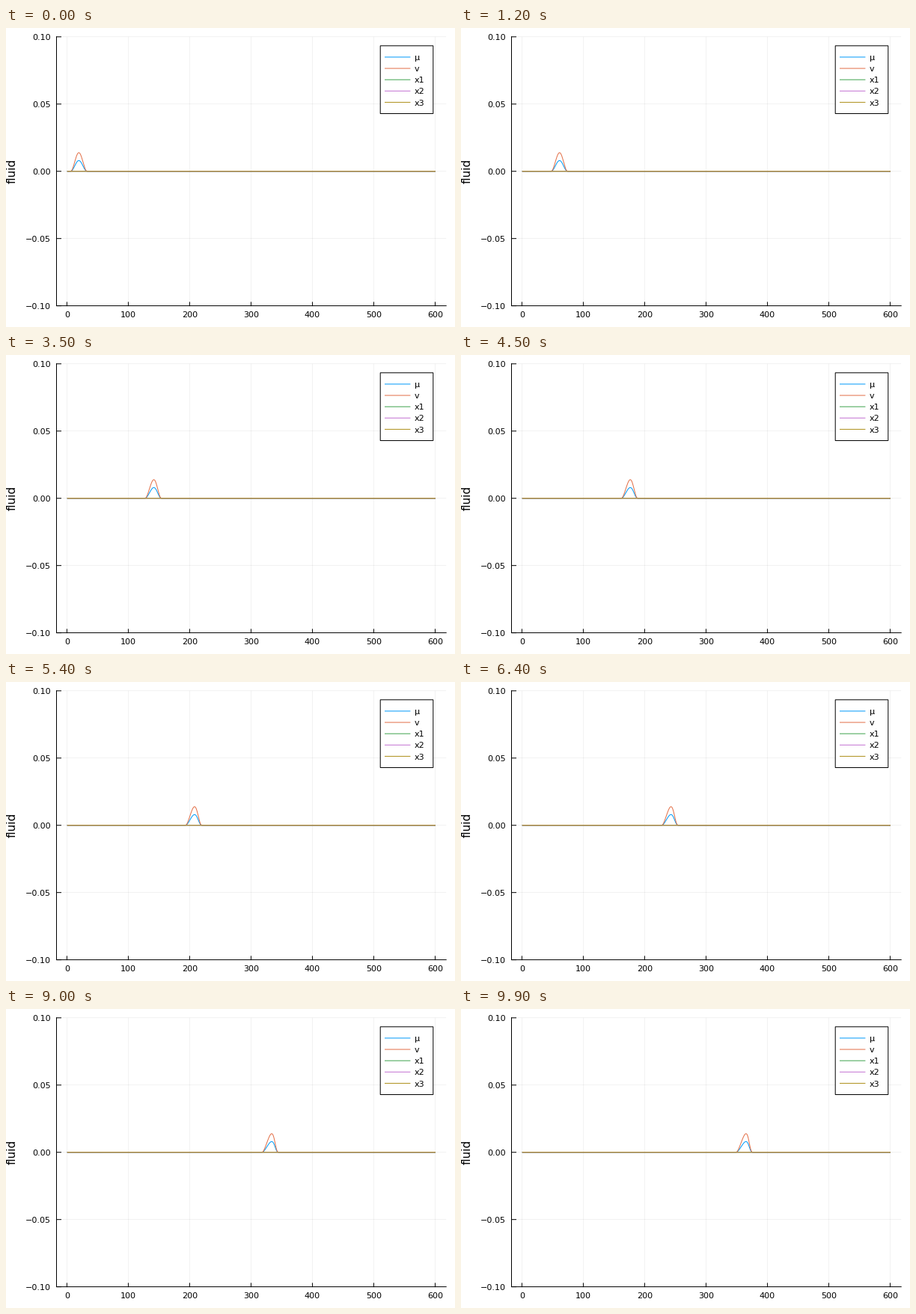
A matplotlib script that plays this animation: 600 by 400 pixels, repeating every 10 s.

```python
import numpy as np
import matplotlib.pyplot as plt
from matplotlib.animation import FuncAnimation
from matplotlib.patches import Rectangle

W, H, DPI = 600, 400, 100
PX = 72 / DPI
LEFT, RIGHT, TOP, BOTTOM = 67.5, 588.2, 11.81, 371.61
X_MIN, X_MAX, Y_LIM = -16.97, 617.97, 0.1
FRAMES, INTERVAL = 100, 100

SERIES = [("μ", "#009afa"), ("v", "#e36f47"), ("x1", "#3ea44e"),
          ("x2", "#c371d2"), ("x3", "#ac8e18")]

SOUND = np.sqrt(3)
DT = 2.0
START, HALF_WIDTH, PEAK = 19.4, 13.5, 0.008

plt.rcParams["font.family"] = "DejaVu Sans"
fig = plt.figure(figsize=(W / DPI, H / DPI), dpi=DPI, facecolor="white")
ax = fig.add_axes([0, 0, 1, 1])
ax.set_xlim(0, W)
ax.set_ylim(H, 0)
ax.axis("off")


def px(x):
    return LEFT + (x - X_MIN) / (X_MAX - X_MIN) * (RIGHT - LEFT)


def py(y):
    return TOP + (Y_LIM - y) / (2 * Y_LIM) * (BOTTOM - TOP)


def line(xs, ys, color="black", width=1.0, **kw):
    return ax.plot(xs, ys, color=color, lw=width * PX, snap=False, **kw)[0]


def label(x, y, text, size=8, **kw):
    ax.text(x, y, text, size=size, va=kw.pop("va", "baseline"), **kw)


def draw_axes():
    x_ticks = range(0, 601, 100)
    y_ticks = np.linspace(-Y_LIM, Y_LIM, 5)
    grid = dict(width=0.5, alpha=0.1, solid_capstyle="butt")
    for x in x_ticks:
        line([px(x)] * 2, [TOP, BOTTOM], **grid)
        line([px(x)] * 2, [BOTTOM, BOTTOM - 4.7])
        label(px(x), 387, str(x), ha="center")
    for y in y_ticks:
        line([LEFT, RIGHT], [py(y)] * 2, **grid)
        line([LEFT, LEFT + 6], [py(y)] * 2)
        label(59.6, py(y) + 4.2, f"{y:.2f}".replace("-", "−"), ha="right")
    line([LEFT, LEFT, RIGHT], [TOP, BOTTOM, BOTTOM])
    label(16, py(0), "fluid", size=11, rotation=90, ha="right", va="center")


def draw_legend():
    x, y, w, row = 500.2, 23.8, 70.6, 15.12
    ax.add_patch(Rectangle((x, y), w, 6 * row, fc="white", ec="black",
                           lw=PX, snap=False, zorder=5))
    for i, (name, color) in enumerate(SERIES, 1):
        mid = y + i * row
        line([506, 540.4], [mid, mid], color, zorder=6,
             solid_capstyle="butt")
        label(545.8, mid + 4.2, name, zorder=6)


draw_axes()
draw_legend()
curves = [line([], [], color, zorder=3) for _, color in SERIES]

# Simple wave: each point of the pulse travels at its own speed c + v.
offset = np.linspace(-HALF_WIDTH, HALF_WIDTH, 161)
density = PEAK * np.cos(np.pi * offset / (2 * HALF_WIDTH)) ** 2
velocity = SOUND * density


def update(frame):
    x = START + offset + (SOUND + velocity) * DT * frame
    x = px(np.concatenate([[1], x, [600]]))
    flat = np.zeros_like(density)
    for curve, values in zip(curves, (density, velocity, flat, flat, flat)):
        curve.set_data(x, py(np.pad(values, 1)))
    return curves


anim = FuncAnimation(fig, update, frames=FRAMES, interval=INTERVAL,
                     repeat=True, repeat_delay=0, blit=False)
plt.show()
```
